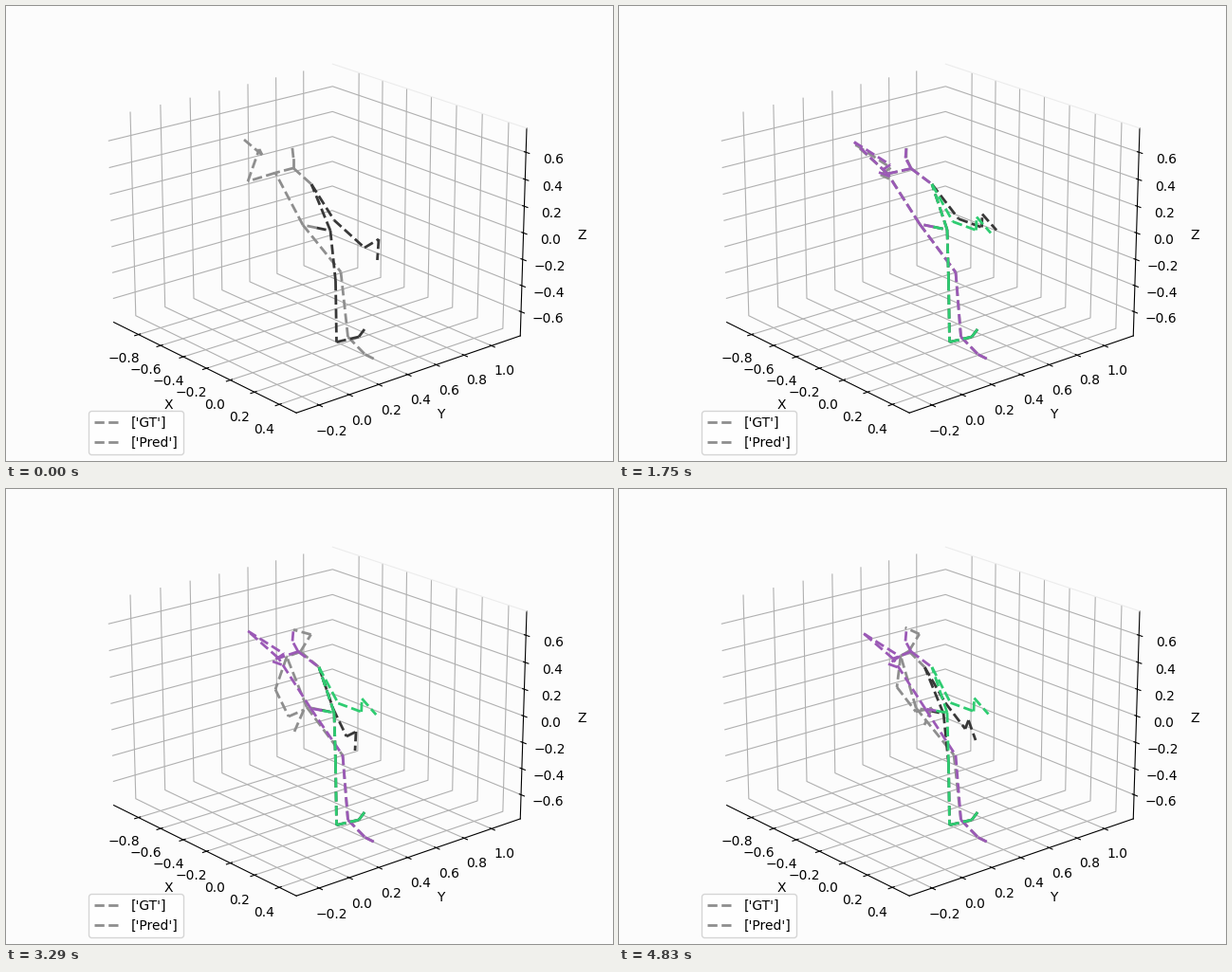
Recreate the animation shown at these times as a matplotlib script. Size 640x480 px, loop 4.9 s.

```python
import numpy as np
import matplotlib.pyplot as plt
from matplotlib.animation import FuncAnimation
from matplotlib.lines import Line2D

FRAMES, INTERVAL = 70, 70
PRED_START = 25
BACKGROUND = "#fcfcfc"
GREY, DARK = "#8e8e8e", "#383838"
PURPLE, GREEN = "#9b59b6", "#2ecc71"


def vec(*points):
    return np.array(points, float)


# Arm poses as elbow, wrist, thumb, hand in stage pixels.
LEFT_RAISED = vec((255, 185), (267, 151), (270, 157), (251, 141))
LEFT_REACH = vec((248, 143.5), (286, 167.5), (274, 175.5), (285, 179.5))
LEFT_HANG = vec((284, 211.5), (298, 240), (314, 233), (304, 256))
LEFT_REST = vec((293, 209), (313, 235), (330, 231), (322, 249))
RIGHT_RAISED = vec((346, 226), (378, 255), (393, 246), (391.5, 268))
RIGHT_REACH = vec((358, 224.5), (382.5, 233.5), (383, 219.5), (398, 236.5))
RIGHT_HANG = vec((349, 225), (373, 248), (377, 236), (386, 256))
RIGHT_FOLD = vec((345, 232), (359, 261), (369, 256), (368, 276))
RIGHT_REST = vec((344, 225.5), (365, 253), (368.5, 244), (376, 265))

# (start frame, end frame, pose reached)
LEFT_MOVES = [(0, 15, LEFT_REACH), (23, 39, LEFT_HANG), (47, 64, LEFT_REST)]
RIGHT_MOVES = [(0, 15, RIGHT_REACH), (25, 39, RIGHT_HANG),
               (39, 47, RIGHT_FOLD), (47, 62, RIGHT_REST)]

# Sideways bulge of each arm joint during the first swing.
LEFT_BULGE = np.linspace(-8, 0, 4)
RIGHT_BULGE = np.linspace(0, 13, 4)

LEGS = {
    "knee_r": vec(347.5, 290), "ankle_r": vec(348.5, 354.5),
    "foot_r": vec(372, 349), "toe_r": vec(378, 341),
    "ankle_l": vec(360.5, 349), "foot_l": vec(378.5, 367.5),
    "toe_l": vec(388.5, 372.5),
}


def ease(frame, start, end):
    u = min(max((frame - start) / (end - start), 0), 1)
    return u * u * (3 - 2 * u)


def swing(frame, arm_pose, moves, bulge):
    for start, end, goal in moves:
        arm_pose = arm_pose + (goal - arm_pose) * ease(frame, start, end)
    arc = np.sin(np.pi * ease(frame, *moves[0][:2]))
    return arm_pose + np.outer(bulge * arc, (1, 0))


def skeleton(lean, drop, settle, left, right):
    """All joints from the body's lean, the left arm's drop and a slow settling."""
    joints = dict(LEGS)
    drift = settle * vec(6, 2)
    joints["knee_l"] = vec(353, 280.5) + lean * vec(2, 0.5)
    joints["hip_l"] = vec(313, 231) + lean * vec(4, -1) + drift
    joints["hip_r"] = vec(342, 237) + lean * vec(4, -1)
    joints["root"] = (joints["hip_l"] + joints["hip_r"]) / 2
    joints["shoulder_l"] = vec(284, 176) + lean * vec(-1, 1) + drop * vec(13, 0) + drift
    joints["shoulder_r"] = vec(322, 188) + lean * vec(8, 0)
    middle = (joints["shoulder_l"] + joints["shoulder_r"]) / 2
    neck = middle + vec(1.5 * lean - 4 * drop, -11) - drift / 2
    joints["neck"] = neck
    joints["nose"] = neck + vec(11 * drop - 6 * lean * (1 - drop), -11 - 7 * drop)
    joints["crown"] = vec(301.5, 146) + lean * vec(1.5, 2.5)
    for side, points in (("l", left), ("r", right)):
        for name, point in zip(("elbow", "wrist", "thumb", "hand"), points):
            joints[f"{name}_{side}"] = point
    return joints


def true_pose(frame):
    lean = ease(frame, 0, 18) - ease(frame, 47, 72)
    left = swing(frame, LEFT_RAISED, LEFT_MOVES, LEFT_BULGE)
    right = swing(frame, RIGHT_RAISED, RIGHT_MOVES, RIGHT_BULGE)
    return skeleton(lean, ease(frame, 23, 39), 0, left, right)


def pred_pose(frame):
    """The reaching pose, held while it slowly sinks forward."""
    u = max(frame - PRED_START, 0) / (FRAMES - 1 - PRED_START)
    settle = np.sin(np.pi / 2 * u)
    left = LEFT_REACH + settle * vec(10, 9)
    right = RIGHT_REACH + vec(-6, 3) + settle * vec(-2.5, -2)
    return skeleton(1, 0, settle, left, right)


def chain(*joints):
    return list(zip(joints, joints[1:]))


def limb(side, *names):
    return chain(*(f"{name}_{side}" for name in names))


LEG = ("hip", "knee", "ankle", "foot", "toe")
ARM = ("hip", "shoulder", "elbow", "wrist", "thumb", "hand")

# (bones, drawn in the left-side colour)
LIMBS = [
    (limb("l", *LEG), True),
    (limb("r", *LEG), False),
    ([("root", "hip_l")], True),
    ([("root", "hip_r")], False),
    (limb("r", *ARM), False),
    (limb("l", *ARM), True),
    ([("neck", "shoulder_l"), ("neck", "shoulder_r")], True),
    (chain("neck", "nose", "crown"), True),
]
BONES = [(a, b, left) for bones, left in LIMBS for a, b in bones]


def make_space(fig):
    ax = fig.add_axes([0, 0, 1, 1], projection="3d", facecolor=BACKGROUND)
    ax.view_init(elev=20, azim=-40)
    span = 1.5625
    xlim, ylim, zlim = [(low, low + span) for low in (-1.028, -0.348, -0.786)]
    ax.plot(xlim, [ylim[1]] * 2, [zlim[1]] * 2, color="#ececec", lw=0.8)
    ax.set(xlim=xlim, ylim=ylim, zlim=zlim, xlabel="X", ylabel="Y", zlabel="Z")
    ax.set_xticks(np.arange(-4, 3) / 5)
    ax.set_yticks(np.arange(-1, 6) / 5)
    ax.set_zticks(np.arange(-3, 4) / 5)
    for axis in (ax.xaxis, ax.yaxis, ax.zaxis):
        axis.set_pane_color((1, 1, 1, 0))
    handles = [Line2D([], [], color=GREY, lw=2, ls="--", label=f"['{name}']")
               for name in ("GT", "Pred")]
    ax.legend(handles=handles, loc="lower left")


def make_stage(fig):
    ax = fig.add_axes([0, 0, 1, 1], facecolor="none")
    ax.set(xlim=(0, 640), ylim=(480, 0))
    ax.axis("off")
    return ax


def make_body(ax, left_color, right_color):
    return [ax.plot([], [], ls="--", lw=2,
                    color=left_color if left else right_color)[0]
            for _, _, left in BONES]


def place(lines, joints):
    for line, (a, b, _) in zip(lines, BONES):
        line.set_data(*zip(joints[a], joints[b]))


fig = plt.figure(figsize=(6.4, 4.8), dpi=100, facecolor=BACKGROUND)
make_space(fig)
stage = make_stage(fig)
true_body = make_body(stage, GREY, DARK)
pred_body = make_body(stage, PURPLE, GREEN)


def update(frame):
    place(true_body, true_pose(frame))
    place(pred_body, pred_pose(frame))
    for line in pred_body:
        line.set_visible(frame >= PRED_START)
    return true_body + pred_body


anim = FuncAnimation(fig, update, frames=FRAMES, interval=INTERVAL,
                     init_func=lambda: update(0), repeat=True, repeat_delay=0)
plt.show()
```
